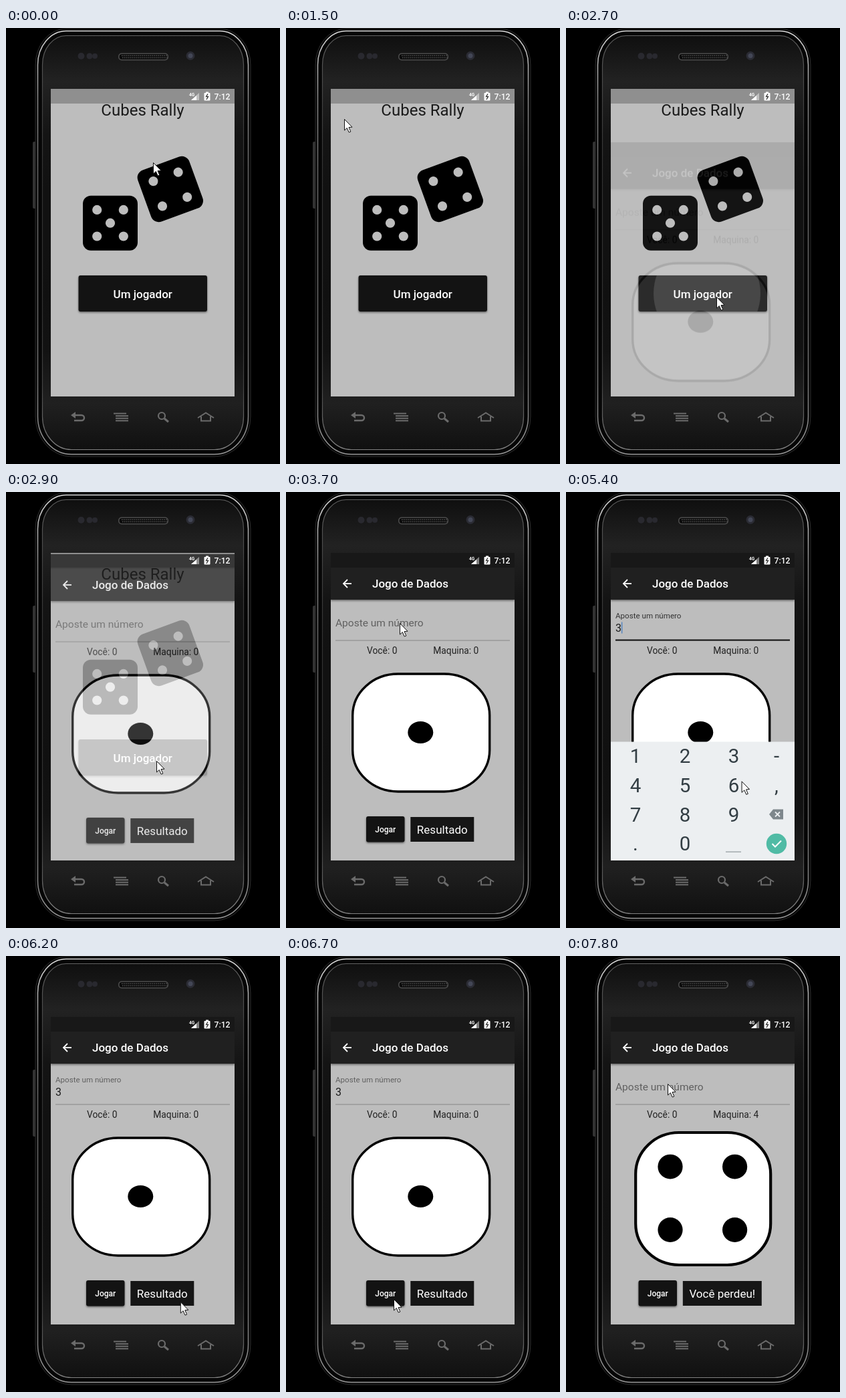
Animation of 410x652 px, one loop 8 s. Source, as an HTML page with a canvas:

```html
<!DOCTYPE html>
<html lang="pt">
<head>
<meta charset="utf-8">
<title>Jogo de Dados</title>
<style>
html, body { margin: 0; width: 100%; height: 100%; overflow: hidden; background: #000; }
canvas { display: block; width: 410px; height: 652px; }
</style>
</head>
<body>
<canvas id="stage"></canvas>
<script>
const W = 410, H = 652, LOOP = 8000, STEP = 100;
const BG = '#bdbdbd', INK = '#131313', ICON = '#6b6b6b';
const CORNERS = [[-1, -1], [1, -1], [-1, 1], [1, 1]];
const dpr = window.devicePixelRatio || 1;

function setup(canvas) {
  canvas.width = W * dpr;
  canvas.height = H * dpr;
  const ctx = canvas.getContext('2d');
  ctx.scale(dpr, dpr);
  return ctx;
}

const main = setup(document.getElementById('stage'));
const layer = setup(document.createElement('canvas'));
let c = main;

// Pointer moves: start time, end time, x, y
const HOME = [220, 201];
const MOVES = [
  [200, 400, 260, 254], [400, 700, 179, 195], [1450, 1500, 87, 136], [1600, 2400, 225, 402],
  [2900, 3650, 170, 196], [3900, 4400, 62, 561], [4400, 4800, 247, 402],
  [5250, 5700, 307, 519], [5900, 6700, 161, 513], [7000, 7800, 152, 191]
];

const span = (t, a, b) => Math.min(1, Math.max(0, (t - a) / (b - a)));
const mix = (a, b, k) => a + (b - a) * k;
const smooth = k => k * k * (3 - 2 * k);
const easeOut = k => 1 - (1 - k) ** 3;

// cubic-bezier(.4, 0, .2, 1)
function standard(k) {
  let lo = 0, hi = 1, s = 0.5;
  for (let i = 0; i < 20; i++, s = (lo + hi) / 2) {
    const x = 1.2 * s * (1 - s) ** 2 + 0.6 * s * s * (1 - s) + s ** 3;
    if (x < k) lo = s; else hi = s;
  }
  return s * s * (3 - 2 * s);
}

const pointerAt = t => MOVES.reduce(([px, py], [a, b, x, y]) => {
  const k = smooth(span(t, a, b));
  return [mix(px, x, k), mix(py, y, k)];
}, HOME);

function rect(x, y, w, h, color) {
  c.fillStyle = color;
  c.fillRect(x, y, w, h);
}

function round(x, y, w, h, r, color) {
  c.beginPath();
  c.roundRect(x, y, w, h, r);
  c.fillStyle = color;
  c.fill();
}

function oval(x, y, rx, ry, color) {
  c.beginPath();
  c.ellipse(x, y, rx, ry, 0, 0, Math.PI * 2);
  c.fillStyle = color;
  c.fill();
}

function poly(points, color) {
  c.beginPath();
  points.forEach(p => c.lineTo(...p));
  c.closePath();
  c.fillStyle = color;
  c.fill();
}

function line(points, color, width) {
  c.beginPath();
  points.forEach(p => c.lineTo(...p));
  stroke(color, width);
}

function stroke(color, width) {
  c.strokeStyle = color;
  c.lineWidth = width;
  c.stroke();
}

function text(str, x, y, size, color, align = 'left', weight = 400) {
  c.font = `${weight} ${size}px Roboto, sans-serif`;
  c.textAlign = align;
  c.fillStyle = color;
  c.fillText(str, x, y);
}

function raised(x, y, w, h, r, color) {
  c.save();
  c.shadowColor = 'rgba(0,0,0,.5)';
  c.shadowBlur = 3 * dpr;
  c.shadowOffsetY = 1.5 * dpr;
  round(x, y, w, h, r, color);
  c.restore();
}

// Evenly spaced colour stops from top to bottom
function vertical(...colors) {
  const g = c.createLinearGradient(0, 0, 0, 641);
  colors.forEach((color, i) => g.addColorStop(i / (colors.length - 1), color));
  return g;
}

// Phone silhouette inset by d
function shell(d) {
  const top = { x: 46 - d, y: 54 - d }, low = { x: 54 - d, y: 60 - d };
  c.beginPath();
  c.roundRect(44 + d, 1 + d, 322 - 2 * d, 640 - 2 * d, [top, top, low, low]);
}

function navIcons() {
  // back
  c.beginPath();
  c.moveTo(102, 579);
  c.arc(113, 583, 4, -Math.PI / 2, Math.PI / 2);
  c.lineTo(102, 587);
  stroke(ICON, 2.4);
  poly([[97, 579], [104, 574], [104, 584]], ICON);
  // menu
  for (let i = 0; i < 4; i++) rect(i ? 164 : 161, 575.5 + i * 3.6, 19, 2, ICON);
  // search
  c.beginPath();
  c.arc(233, 580, 5, 0, Math.PI * 2);
  stroke(ICON, 2.2);
  line([[237, 584], [243, 589]], ICON, 3);
  // home
  line([[287, 583], [299, 575.5], [311, 583]], ICON, 2);
  line([[292, 581], [292, 587.5], [306, 587.5], [306, 581]], ICON, 2);
}

function phone() {
  rect(0, 0, W, H, '#000');
  round(40, 170, 6, 100, 2, '#333');
  shell(0);
  c.fillStyle = '#060606';
  c.fill();
  stroke('#2c2c2c', 1);
  shell(3.5);
  stroke(vertical('#ddd', '#888', '#666', '#666', '#666', '#777', '#999'), 1.5);
  shell(10.5);
  c.fillStyle = vertical('#0c0c0c', '#222', '#141414', '#111', '#111', '#101010', '#121212', '#202020', '#0e0e0e');
  c.fill();
  stroke(vertical('#666', '#444', '#333', '#333', '#333', '#444', '#888'), 1.2);

  [112.5, 125, 133].forEach((x, i) => oval(x, 42, 5 - i / 2, 5 - i / 2, '#29292f'));
  oval(276, 41.5, 6.5, 6.5, '#2b2c34');
  oval(276, 41.5, 3.5, 3.5, '#434756');
  round(168, 37.5, 75, 11, 5, '#4b4b4b');
  round(169.5, 39, 72, 8, 4, '#0b0b0b');
  for (let x = 173; x < 240; x += 3) {
    rect(x, 40.5, 1.6, 1.6, '#505050');
    rect(x + 1, 43.7, 1.6, 1.6, '#505050');
  }
  navIcons();
}

function statusIcons() {
  text('4G', 274, 102, 6.5, '#fff', 'left', 700);
  poly([[277, 108], [289, 108], [289, 97]], 'rgba(255,255,255,.45)');
  poly([[277, 108], [285, 108], [285, 101]], '#fff');
  rect(299, 95.5, 4, 2, '#fff');
  round(296.5, 97, 9, 11.5, 1, '#fff');
  line([[302, 98.5], [299.5, 102.7], [302.5, 102.7], [300, 107]], '#333', 1.3);
  text('7:12', 335.5, 106.5, 12.2, '#fff', 'right', 500);
}

function smallDie(x, y, angle, pips) {
  c.save();
  c.translate(x, y);
  c.rotate(angle);
  round(-41, -41, 82, 82, 12, '#000');
  pips.forEach(([px, py]) => oval(px * 19.8, py * 19.8, 7.1, 7.1, BG));
  c.restore();
}

function homePage(t) {
  rect(67, 91, 275, 460, BG);
  rect(67, 91, 275, 22, '#8f8f8f');
  text('Cubes Rally', 204.5, 131, 24, '#1b1b1b', 'center');
  smallDie(156, 291.7, 0, [...CORNERS, [0, 0]]);
  smallDie(245.8, 241, -Math.PI / 9, CORNERS);
  raised(108.5, 370, 192.5, 54, 3, INK);
  if (t >= 2600) {
    c.save();
    c.beginPath();
    c.roundRect(108.5, 370, 192.5, 54, 3);
    c.clip();
    const r = (t - 2540) * 0.5;
    oval(211, 397, r, r, 'rgba(255,255,255,.13)');
    c.restore();
  }
  text('Um jogador', 204.7, 404, 17, '#fff', 'center', 500);
}

function betField(t) {
  const up = easeOut(span(t, 4000, 4300)) * (1 - easeOut(span(t, 7000, 7300)));
  const focus = t >= 4000 && t < 5900;
  const typed = t >= 5000 && t < 7100;
  text('Aposte um número', 74, mix(200.5, 189, up), mix(15.5, 11.6, up), focus ? '#333' : '#606060');
  if (typed) text('3', 74, 208.5, 16, '#1c1c1c');
  if (focus) {
    rect(74, 220.5, 261, 2, '#0c0c0c');
    if (Math.floor(t / 500) % 2 === 0) rect(typed ? 83 : 74, 194.5, 1.3, 17, '#4a7fc0');
  } else {
    rect(74, 221.5, 261, 1, '#858585');
  }
}

function bigDie(cx, cy, w, h, rx, ry, line) {
  c.beginPath();
  c.roundRect(cx - w / 2, cy - h / 2, w, h, { x: rx, y: ry });
  c.fillStyle = '#fff';
  c.fill();
  stroke('#000', line);
}

function gamePage(t) {
  const rolled = t >= 7100;
  rect(67, 91, 275, 460, BG);
  raised(67, 91, 275, 70, 0, '#202020');
  rect(67, 91, 275, 22, '#181818');
  line([[98, 137], [86, 137]], '#fff', 1.8);
  line([[92, 131], [86, 137], [92, 143]], '#fff', 1.8);
  text('Jogo de Dados', 129, 143, 17, '#fff', 'left', 500);
  betField(t);
  text('Você: 0', 121, 241.7, 13.8, '#222');
  text(`Maquina: ${rolled ? 4 : 0}`, 220.3, 241.7, 13.8, '#222');
  if (rolled) {
    bigDie(205.2, 363, 202, 198, 65, 62, 4.2);
    CORNERS.forEach(([x, y]) => oval(204.3 + x * 48.3, 362.3 + y * 47.2, 18.6, 18.4, '#000'));
  } else {
    bigDie(202.2, 360, 205, 176, 68, 62, 3.4);
    oval(201.3, 359.5, 19, 16.5, '#000');
  }
  const x = rolled ? 108.5 : 120, w = rolled ? 118 : 95;
  raised(x, 485, 57.5, 38.5, 3, INK);
  text('Jogar', x + 28.8, 508.7, 12, '#fff', 'center', 500);
  rect(x + 66.3, 486, w, 37, '#161616');
  text(rolled ? 'Você perdeu!' : 'Resultado', x + 66.3 + w / 2, 511, 17, '#fff', 'center');
}

function keyboard(t) {
  const shown = easeOut(span(t, 4050, 4450)) * (1 - span(t, 5750, 6100) ** 2);
  if (!shown) return;
  const cols = [104, 178, 251, 315];
  c.save();
  c.translate(0, (1 - shown) * 178);
  rect(67, 373.5, 275, 178, '#eceff1');
  ['123-', '456,', '789', '.0'].forEach((keys, row) =>
    [...keys].forEach((key, i) => text(key, cols[i], 405.3 + row * 43.6, 29.5, '#333e44', 'center')));
  rect(239, 537.5, 23, 1.3, '#98a0a4');
  poly([[304, 482], [310, 474.5], [325, 474.5], [325, 489.5], [310, 489.5]], '#7e878c');
  for (const s of [-1, 1]) line([[313, 482 - 3.5 * s], [320, 482 + 3.5 * s]], '#eceff1', 1.8);
  oval(315, 526, 15.2, 15.2, '#50bba5');
  line([[308.5, 526], [313, 530.5], [322, 521.5]], '#fff', 2);
  c.restore();
}

function pointer(x, y) {
  c.save();
  c.translate(x, y);
  c.lineJoin = 'round';
  poly([[0.5, 0.5], [0.5, 17], [4.3, 13.5], [7.2, 20], [9.8, 19], [7, 12.6], [12, 12.2]], '#fff');
  stroke('#111', 1);
  c.restore();
}

// The game page rises by a quarter of its height while it fades in
function openGame(t, k) {
  c = layer;
  gamePage(t);
  c = main;
  c.save();
  c.globalAlpha = k ** 1.75;
  c.translate(0, (1 - standard(k)) * 115);
  c.beginPath();
  c.rect(67, 91, 275, 460);
  c.clip();
  c.drawImage(layer.canvas, 0, 0, W, H);
  c.restore();
}

function draw(t) {
  phone();
  c.save();
  c.beginPath();
  c.rect(67, 91, 275, 460);
  c.clip();
  const k = span(t, 2600, 2960);
  if (k < 1) homePage(t);
  if (k === 1) gamePage(t);
  else if (k > 0) openGame(t, k);
  keyboard(t);
  statusIcons();
  c.restore();
  pointer(...pointerAt(t));
}

function tick() {
  const t = performance.now() % LOOP;
  draw(Math.floor(t / STEP) * STEP);
  requestAnimationFrame(tick);
}
tick();
</script>
</body>
</html>
```
